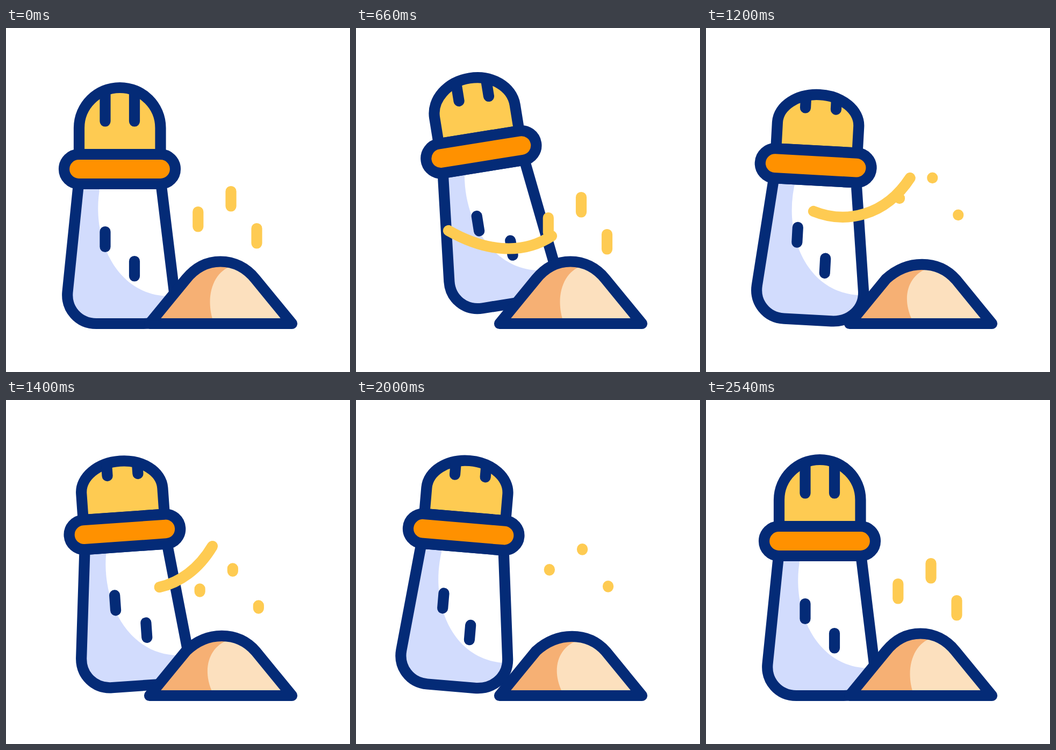
Animation, 640 px wide and 640 px high, one loop 2.8 s. Source, as an HTML page:

```html
<!DOCTYPE html>
<html lang="en">
<head>
<meta charset="utf-8">
<title>Salt shaker</title>
<style>
  html, body { margin: 0; width: 100%; height: 100%; overflow: hidden; background: #fff; }
  svg { display: block; width: 100vw; height: 100vh; }
  .ink { stroke: #042b77; }
  .salt { stroke: #fecb52; fill: none; }
</style>
</head>
<body>
<svg viewBox="0 0 640 640" fill="none" stroke-width="20.2" stroke-linecap="round" stroke-linejoin="round">
  <g id="shaker">
    <path fill="#d2dcfd" d="M135 290L114.500 491C111.500 523 135 550 168 550H256C290 550 316.500 525 313 491L288.500 290Z"/>
    <path fill="#fff" d="M176 290C155 390 205 500 306 499L313 491L288.500 290Z"/>
    <path class="ink" d="M135 290L114.500 491C111.500 523 135 550 168 550H256C290 550 316.500 525 313 491L288.500 290Z"/>
    <path class="ink" d="M184.500 379V407M239 434V461.500"/>
    <path id="dome" class="ink" fill="#fecb52"/>
    <path id="slots" class="ink"/>
    <rect class="ink" x="108" y="235" width="207" height="55" rx="27.500" fill="#ff9100"/>
  </g>
  <path id="grains" class="salt"/>
  <path id="lowTrail" class="salt" pathLength="1" d="M172 377C262 428 357 428 422 326"/>
  <path id="highTrail" class="salt" pathLength="1" d="M200 341C262 366 338 349 384 272"/>
  <path id="mound" fill="#fce0be"/>
  <path id="moundShade" fill="#f6b074"/>
  <path id="moundLine" class="ink"/>
</svg>
<script>
const LOOP = 2800;
const $ = id => document.getElementById(id);
const draw = (id, d) => $(id).setAttribute('d', d);
const mix = (a, b, p) => a + (b - a) * p;

// Value at time t from [time, value] keys; soft blends linear (0) to smoothstep (1).
function track(t, keys, soft = 1) {
  if (t <= keys[0][0]) return keys[0][1];
  for (let i = 1; i < keys.length; i++) {
    const [t0, v0] = keys[i - 1], [t1, v1] = keys[i];
    if (t < t1) {
      const p = (t - t0) / (t1 - t0);
      return mix(v0, v1, mix(p, p * p * (3 - 2 * p), soft));
    }
  }
  return keys[keys.length - 1][1];
}

const TILT = [[310, 0], [665, -9.2], [1125, 5], [1575, -9.2], [2010, 5], [2540, 0]];
const LIFT = [[310, 0], [850, -42], [1225, -6], [1700, -41], [2160, -7], [2540, 0]];
const SQUASH = [[320, 0], [860, 1], [1960, 1], [2540, 0]];
const SETTLE = [[820, 0], [1250, 1], [1600, 0.5], [1980, 1], [2460, 0]];

function drawShaker(t) {
  const tilt = track(t, TILT, 0.4), lift = track(t, LIFT), s = track(t, SQUASH, 0.2);
  $('shaker').setAttribute('transform', `translate(0 ${lift}) rotate(${tilt} 211.5 128)`);
  const top = mix(111, 130.5, s), ctrl = mix(144.5, 155.5, s);
  draw('dome', `M136 235V186C136 ${ctrl} 170 ${top} 211.8 ${top}S287.500 ${ctrl} 287.500 186V235Z`);
  const start = mix(119, 136, s), end = mix(173.5, 156.3, s);
  draw('slots', `M${184.5 + 2 * s} ${start}V${end}M${239 + 4.5 * s} ${start}V${end}`);
}

// Each state is [x shift, top, bottom] relative to a grain's resting top.
const REST = [0, 0, 27.5], LANDED = [4.2, 90, 117.5];
const DOT = [2.7, -28.5, -28.5], SUNK = [5, 112, 131.5];
const FALLS = [[530, 1130, REST, LANDED], [1130, 1925, DOT, SUNK], [1925, 2460, DOT, REST]];

function drawGrains(t) {
  const [t0, t1, from, to] = FALLS.find(f => t < f[1]) || FALLS[2];
  const p = track(t, [[t0, 0], [t1, 1]]);
  const [dx, top, bottom] = from.map((v, i) => mix(v, to[i], p));
  draw('grains', [[357.3, 342], [418.5, 304], [466.5, 373]]
    .map(([x, y]) => `M${x + dx} ${y + top}V${y + bottom + 0.01}`).join(''));
}

function drawTrail(id, t, start) {
  const head = track(t, [[start, 0], [start + 370, 1]], 0);
  const tail = track(t, [[start + 406, 0], [start + 776, 1]], 0);
  const style = $(id).style;
  style.display = head - tail > 0.002 ? '' : 'none';
  style.strokeDasharray = `${head - tail} 2`;
  style.strokeDashoffset = -tail;
}

function drawMound(t) {
  const s = track(t, SETTLE);
  const at = (a, b) => mix(a, b, s);
  const top = at(434.5, 440);
  const hill = `M267 550L335 467C${at(352, 354)} ${at(446, 450)} ${at(374, 375)} ${top} ${at(399, 402)} ${top}` +
    `S${at(447, 449)} ${at(446, 450)} ${at(464, 465)} ${at(467, 468)}L532 550Z`;
  draw('mound', hill);
  draw('moundLine', hill);
  draw('moundShade', `M387 550C${at(369, 360)} 502 ${at(385, 377)} ${at(453, 460)} ${at(420, 411)} ${at(443, 448)}` +
    `L395 ${top + 2}L362 447L335 467L267 550Z`);
}

function frame() {
  const t = performance.now() % LOOP;
  drawShaker(t);
  drawGrains(t);
  drawTrail('lowTrail', t, 400);
  drawTrail('highTrail', t, 845);
  drawMound(t);
  requestAnimationFrame(frame);
}
frame();
</script>
</body>
</html>
```
